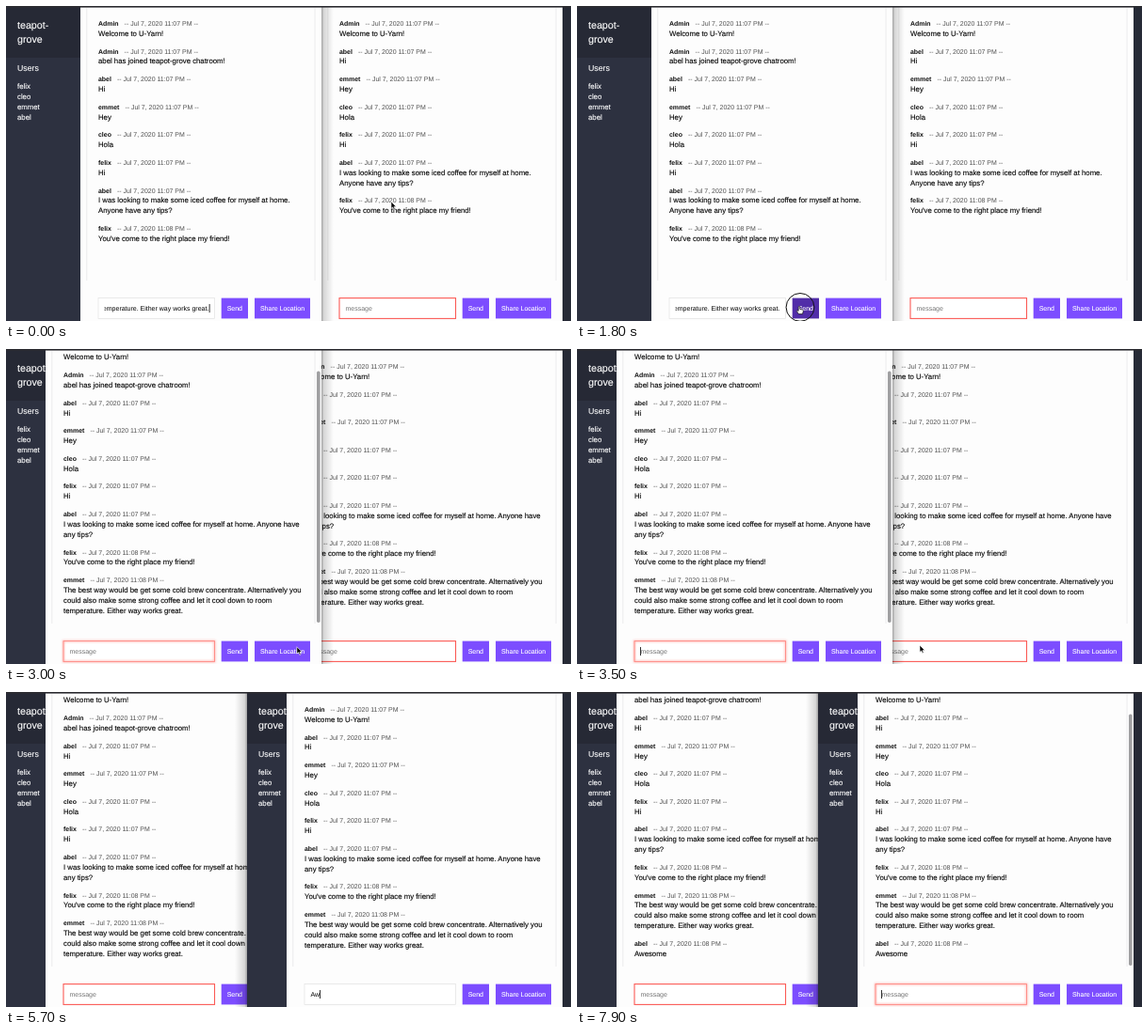
Recreate the animation shown at these times as an HTML page. Size 600 px wide and 335 px high, loop 8 s.

```html
<!DOCTYPE html>
<html lang="en">
<head>
<meta charset="utf-8">
<title>Chat room</title>
<style>
  html, body { margin: 0; width: 100%; height: 100%; overflow: hidden; background: #262a36; }
  svg { display: block; }
  text { font-family: "Liberation Sans", Arial, sans-serif; text-rendering: geometricPrecision; white-space: pre; }
  .body { font-size: 7.78px; fill: #000; stroke: #000; stroke-width: .1px; }
  .name { font-size: 6.95px; font-weight: bold; fill: #111; }
  .date { font-size: 6.98px; font-weight: normal; fill: #505050; }
  .field { font-size: 7px; }
  .button { font-size: 7px; fill: #fff; stroke: #fff; stroke-width: .12px; text-anchor: middle; }
  .room, .head, .user { fill: #fff; stroke: #fff; stroke-width: .12px; }
  .room { font-size: 10.7px; }
  .head { font-size: 8.75px; }
  .user { font-size: 7.78px; }
</style>
</head>
<body>
<svg id="stage" width="600" height="335" viewBox="0 0 600 335">
  <defs>
    <linearGradient id="shadeR">
      <stop offset="0" stop-color="#000" stop-opacity=".36"/>
      <stop offset=".2" stop-color="#000" stop-opacity=".15"/>
      <stop offset="1" stop-color="#000" stop-opacity="0"/>
    </linearGradient>
    <linearGradient id="shadeL" x1="1" x2="0" href="#shadeR"/>
    <filter id="glow" x="-10%" y="-50%" width="120%" height="200%">
      <feGaussianBlur stdDeviation="1"/>
    </filter>
  </defs>
  <g id="scene"></g>
</svg>
<script>
const LOOP = 8000, WIDTH = 335, RIGHT_X = 256;
const SENT = 1950, SWITCH = 3900, REPLY = 7600;
const LINE = 10.9, PITCH = 29.6;
const BAR_Y = 310.6, BAR_H = 21.8, BAR_TEXT = 324.1;
const USERS = ["felix", "cleo", "emmet", "abel"];
const KEYS = [5000, 5700, 6100, 6500, 6900, 7100, 7300];
const WORD = "Awesome";
const PATH = [
  [100, 409, 208], [1200, 236, 319], [2400, 236, 319],
  [3500, 364, 315], [3880, 377.5, 323]
];

const scene = document.getElementById("scene");
const text = (cls, x, y, s, extra = "") =>
  `<text class="${cls}" x="${x}" y="${y}" ${extra}>${s}</text>`;
const rect = (x, y, w, h, fill, extra = "") =>
  `<rect x="${x}" y="${y}" width="${w}" height="${h}" fill="${fill}" ${extra}/>`;

function messages(id, t) {
  const wide = t >= SENT;
  const list = [
    ["Admin", 7, "Welcome to U-Yarn!"],
    ["Admin", 7, "abel has joined teapot-grove chatroom!"],
    ["abel", 7, "Hi"],
    ["emmet", 7, "Hey"],
    ["cleo", 7, "Hola"],
    ["felix", 7, "Hi"],
    ["abel", 7, ...(wide
      ? ["I was looking to make some iced coffee for myself at home. Anyone have", "any tips?"]
      : ["I was looking to make some iced coffee for myself at home.", "Anyone have any tips?"])],
    ["felix", 8, "You've come to the right place my friend!"]
  ];
  if (id) list.splice(1, 1);
  if (wide) list.push(["emmet", 8,
    "The best way would be get some cold brew concentrate. Alternatively you",
    "could also make some strong coffee and let it cool down to room",
    "temperature. Either way works great."]);
  if (t >= REPLY) list.push(["abel", 8, WORD]);
  return list;
}

function scrollOf(id, t) {
  if (t >= REPLY) return id ? 20.5 : 50.1;
  return !id && t >= SENT ? 20.5 : 0;
}

function messageList(id, t, x) {
  let y = 20.9 - scrollOf(id, t), out = "";
  for (const [who, minute, ...lines] of messages(id, t)) {
    out += text("name", x, y,
      `${who}<tspan class="date" dx="6">-- Jul 7, 2020 11:0${minute} PM --</tspan>`);
    lines.forEach((s, i) => out += text("body", x, y + LINE * (i + 1), s));
    y += PITCH + LINE * (lines.length - 1);
  }
  return out;
}

function button(x, w, label, dark) {
  return rect(x, BAR_Y, w, BAR_H, dark ? "#512da8" : "#7c4dff") +
    text("button", x + w / 2, BAR_TEXT, label);
}

function caretOn(t) {
  const start = t < SENT ? 0 : t < SWITCH ? 2050 : t < KEYS[0] ? SWITCH : t < REPLY ? 6500 : REPLY;
  return Math.floor(Math.max(0, t - start) / 500) % 2 === 0;
}

function inputBox(id, t, x) {
  const focus = id === (t >= SWITCH ? 1 : 0);
  const typed = id && t < REPLY ? WORD.slice(0, KEYS.filter(k => k <= t).length) : "";
  const long = !id && t < SENT;
  const w = 221.5 - x, left = x + 6.5;
  const frame = (color, sw, extra) =>
    rect(x, BAR_Y, w, BAR_H, "none", `stroke="${color}" stroke-width="${sw}" ${extra || ""}`);
  let out = rect(x, BAR_Y, w, BAR_H, "#fff"), caret = left;
  if (long || typed) out += frame("#e2e2e2", .7);
  else if (focus) out += frame("#ff6b62", 2, 'filter="url(#glow)" opacity=".45"') + frame("#ff8780", .9);
  else out += frame("#fb5a55", 1.1);

  if (long) {
    caret = 216;
    out += `<svg x="${left}" y="${BAR_Y}" width="112" height="22">` +
      text("field", 215.3 - left, BAR_TEXT - BAR_Y, "room temperature. Either way works great.", 'text-anchor="end"') + "</svg>";
  } else if (typed) {
    out += text("field", left, BAR_TEXT, typed);
    // Advance widths in em for the letters typed so far
    const em = { A: .667, w: .722, e: .556, s: .5, o: .556, m: .833 };
    caret = left + .3 + 7 * [...typed].reduce((sum, c) => sum + em[c], 0);
  } else {
    out += text("field", left, BAR_TEXT, "message", 'fill="#757575"');
  }
  if (focus && caretOn(t)) out += rect(caret - .3, 317, .8, 9, "#000");
  return out;
}

function chatWindow(id, t, hover) {
  const side = t < SENT ? 79 : 42, x = side + 19;
  let out = rect(0, 0, WIDTH, 335, "#fdfdfd");
  out += rect(0, 0, side, 335, "#2d3140") + rect(0, 0, side, 55, "#262935");
  out += `<svg width="${side}" height="335">` +
    text("room", 12, 23.6, "teapot-") + text("room", 12, 38.6, "grove") +
    text("head", 12, 69, "Users") +
    USERS.map((u, i) => text("user", 12, 88.3 + i * LINE, u)).join("") + "</svg>";
  out += rect(side + 6.5, 2, .7, 290, "#e4e4e6") + rect(327.7, 2, .7, 290, "#e4e4e6");
  out += `<svg width="${WIDTH}" height="292">${messageList(id, t, x)}</svg>`;
  if (scrollOf(id, t)) out += rect(330, 23.5, 3.6, 267.5, "#a0a0a2", 'rx="1.8"');
  out += inputBox(id, t, x) + button(228.7, 28.3, "Send", hover) + button(264, 59, "Share Location");
  return `<svg x="${id * RIGHT_X}" width="${WIDTH}" height="335">${out}</svg>`;
}

function mouseAt(t) {
  let [, x, y] = PATH[0];
  for (let i = 1; i < PATH.length; i++) {
    const [t0, x0, y0] = PATH[i - 1], [t1, x1, y1] = PATH[i];
    if (t < t0) break;
    const k = Math.min(1, (t - t0) / (t1 - t0)), e = k * k * (3 - 2 * k);
    x = x0 + (x1 - x0) * e;
    y = y0 + (y1 - y0) * e;
  }
  return [x, y];
}

function pointer(t, [x, y], hover) {
  if (t >= KEYS[0]) return "";
  let shape;
  if (t >= SWITCH)
    shape = '<path d="M-1.5-3.6Q0-3.6 0-2.6Q0-3.6 1.5-3.6M0-2.6V2.6M-1.5 3.6Q0 3.6 0 2.6Q0 3.6 1.5 3.6" fill="none" stroke="#111" stroke-width=".8"/>';
  else if (hover)
    shape = '<path d="M-.8.8Q0-.5.8.8V3.4L3.6 4.1Q4.5 4.4 4.3 5.5L3.5 8.6H-.5L-2.8 5.4Q-2.5 4.2-.8 5.3Z" fill="#fff" stroke="#111" stroke-width=".7"/>';
  else
    shape = '<path d="M0 0V7.4L1.7 5.9L2.9 8.6L4.1 8.1L3 5.4H5.3Z" fill="#000" stroke="#fff" stroke-width=".6"/>';
  const ring = t >= 1800 && t < SENT
    ? '<circle cx="1" cy="1.4" r="14.9" fill="none" stroke="#111" stroke-width="1"/>' : "";
  return `<g transform="translate(${x.toFixed(2)} ${y.toFixed(2)})">${ring}${shape}</g>`;
}

function render(t) {
  const mouse = mouseAt(t), [mx, my] = mouse;
  const hover = t < SWITCH && mx > 228.7 && mx < 257 && my > 311;
  const left = chatWindow(0, t, hover), right = chatWindow(1, t, false);
  const stack = t < SWITCH
    ? right + rect(WIDTH, 0, 13, 335, "url(#shadeR)") + left
    : left + rect(RIGHT_X - 13, 0, 13, 335, "url(#shadeL)") + right;
  return rect(0, 0, 600, 335, "#262a36") + stack +
    rect(0, 0, 600, 1.6, "#2b2b30") + pointer(t, mouse, hover);
}

let last = "";
function tick(now) {
  const next = render(now % LOOP);
  if (next !== last) scene.innerHTML = last = next;
  requestAnimationFrame(tick);
}
tick(performance.now());
</script>
</body>
</html>
```
